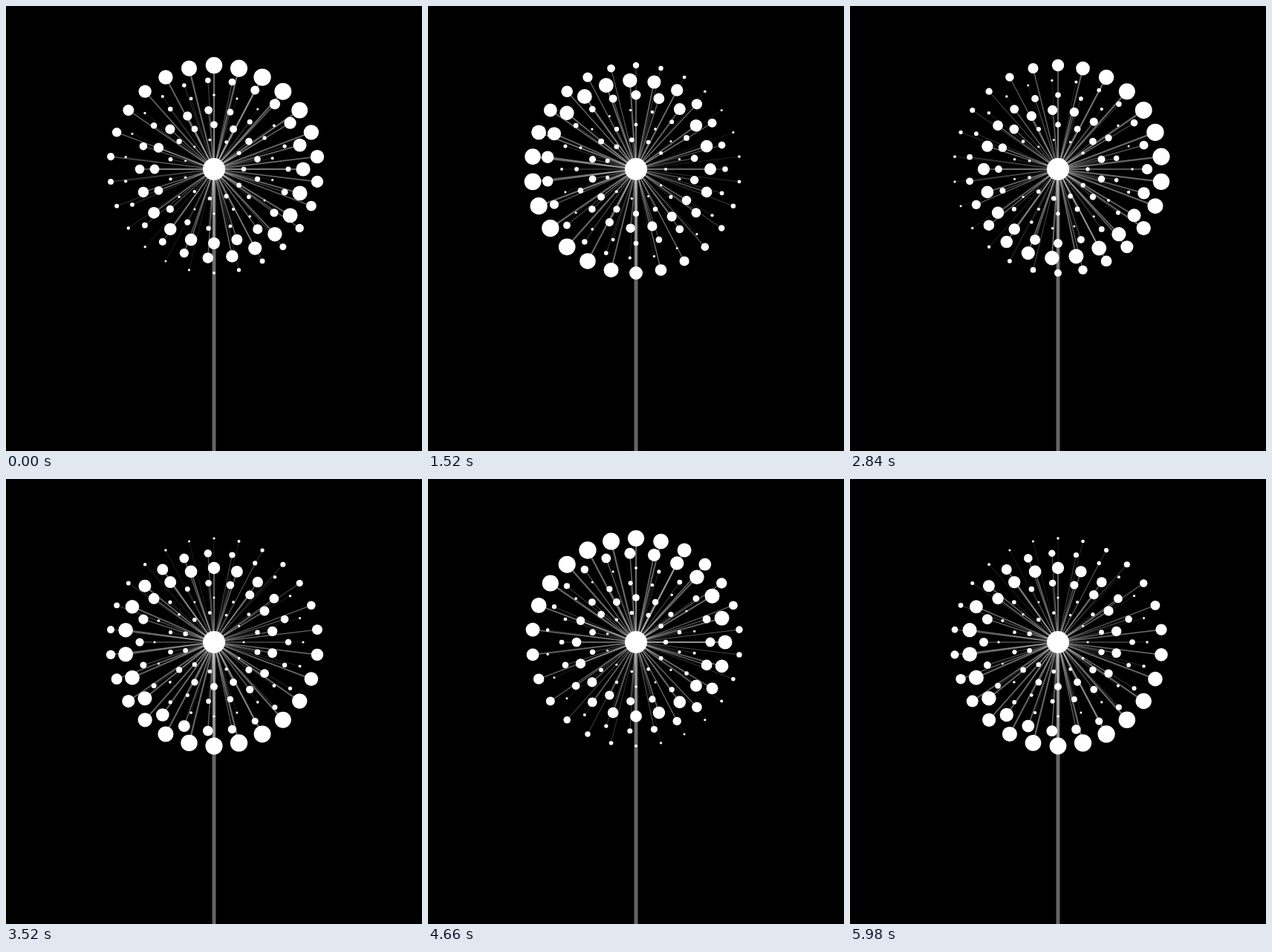
These frames come from a looping animation (560 px wide and 600 px high, 6000 ms). An HTML page:

```html
<!DOCTYPE html>
<html lang="en">
<head>
<meta charset="utf-8">
<title>Dandelion</title>
<style>
  html, body { margin: 0; width: 100%; height: 100%; overflow: hidden; background: #000; }
  svg { display: block; width: 560px; height: 600px; }
  line { stroke: #fff; stroke-opacity: .392; }
  circle { fill: #fff; }
</style>
</head>
<body>
<svg viewBox="0 0 560 600">
  <line x1="280" y1="220" x2="280" y2="600" stroke-width="5"/>
  <g id="stalks"></g>
  <g id="seeds"></g>
  <circle cx="280" cy="220" r="15"/>
</svg>
<script>
const LOOP = 6000, STEP = 20, TURN = 0.05, START = 2;
const CX = 280, CY = 220, MIN_R = 1.5;
const stalks = document.getElementById('stalks');
const seeds = document.getElementById('seeds');

function add(parent, tag, attrs) {
  const el = document.createElementNS('http://www.w3.org/2000/svg', tag);
  for (const key in attrs) el.setAttribute(key, attrs[key]);
  return parent.appendChild(el);
}

// Six rings, each with three more seeds and a quarter turn back from the last.
const parts = [];
for (let ring = 0; ring < 6; ring++) {
  const radius = 40 + ring * 20;
  const count = 11 + ring * 3;
  for (let k = 0; k < count; k++) {
    const phase = k / count * Math.PI * 2;
    const angle = phase - ring * Math.PI / 2;
    const x = CX + radius * Math.cos(angle);
    const y = CY + radius * Math.sin(angle);
    parts.push({
      phase,
      maxR: radius / 12,
      stalk: add(stalks, 'line', { x1: CX, y1: CY, x2: x, y2: y }),
      seed: add(seeds, 'circle', { cx: x, cy: y })
    });
  }
}

function draw(time) {
  const theta = START + Math.floor((time % LOOP) / STEP + 1e-6) * TURN;
  for (const { phase, maxR, stalk, seed } of parts) {
    const wave = (1 + Math.sin(theta - phase)) / 2;
    const r = MIN_R + (maxR - MIN_R) * wave;
    seed.setAttribute('r', r);
    stalk.setAttribute('stroke-width', r / 5);
  }
}

let begin;
function tick(now) {
  begin ??= now;
  draw(Math.max(0, now - begin));
  requestAnimationFrame(tick);
}
draw(0);
requestAnimationFrame(tick);
</script>
</body>
</html>
```
